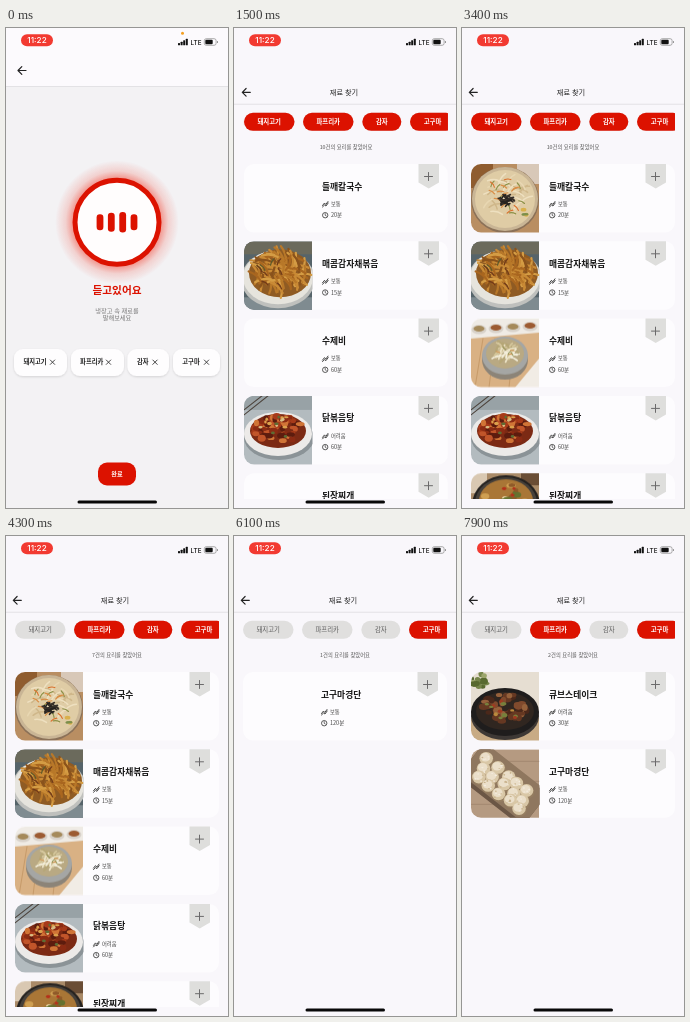
Write an HTML page that moves like this. It is 222 px wide and 480 px high and loops after 8 s.

```html
<!DOCTYPE html>
<html lang="ko">
<head>
<meta charset="utf-8">
<title>재료 찾기</title>
<style>
html, body { margin: 0; width: 100%; height: 100%; overflow: hidden; background: #f9f7fb; }
svg { display: block; width: 222px; height: 480px; }
text { font-family: "Noto Sans CJK KR", "Noto Sans CJK", "Noto Sans KR", sans-serif; }
.latin { font-family: Inter, Roboto, sans-serif; }
.line { fill: none; stroke-linecap: round; stroke-linejoin: round; }
.voice { animation: leave 8s linear infinite; }
.list { animation: enter 8s linear infinite; }
.glow, .bar { transform-box: fill-box; transform-origin: center; }
.glow { animation: glow 1s ease-in-out infinite; }
.bar { animation: bar .8s ease-in-out infinite alternate; }
.bar:nth-of-type(even) { animation-name: bar2; }
@keyframes enter {
  0%, 13.125% { transform: translateX(230px); animation-timing-function: cubic-bezier(.25,.6,.25,1); }
  18.5% { transform: translateX(1px); }
  24%, 100% { transform: none; }
}
@keyframes leave {
  0%, 13.125% { transform: none; animation-timing-function: cubic-bezier(.25,.6,.25,1); }
  18.5%, 100% { transform: translateX(-74px); }
}
@keyframes glow { 50% { transform: scale(1.1); opacity: .75; } }
@keyframes bar { to { transform: scaleY(1.25); } }
@keyframes bar2 { to { transform: scaleY(.75); } }
</style>
</head>
<body>
<svg id="stage" viewBox="0 0 222 480"></svg>
<script>
const LOOP = 8000, RED = '#dc1200';
const rules = [];

// Style that shows an element only from a to b (ms)
function show(a, b) {
  const name = 'show' + rules.length, pc = t => t / LOOP * 100 + '%';
  rules.push(`@keyframes ${name}{0%{opacity:0}${pc(a)}{opacity:1}${pc(b)}{opacity:0}}`);
  return `style="animation:${name} ${LOOP}ms step-end infinite"`;
}

let seed = 7;
const rnd = () => (seed = seed * 16807 % 2147483647) / 2147483647;
const pick = list => list[Math.floor(rnd() * list.length)];

const rect = (x, y, w, h, fill, r = 0, extra = '') =>
  `<rect x="${x}" y="${y}" width="${w}" height="${h}" rx="${r}" fill="${fill}" ${extra}/>`;
const oval = (x, y, rx, ry, fill) => `<ellipse cx="${x}" cy="${y}" rx="${rx}" ry="${ry}" fill="${fill}"/>`;
const shape = (d, fill) => `<path d="${d}" fill="${fill}"/>`;
const line = (d, stroke, width) =>
  `<path class="line" d="${d}" stroke="${stroke}" stroke-width="${width}"/>`;
// y is the optical middle of the line
const text = (x, y, size, label, fill, weight = 400, anchor = 'middle') =>
  `<text x="${x}" y="${y + size * .37}" font-size="${size}" font-weight="${weight}" fill="${fill}" text-anchor="${anchor}">${label}</text>`;
const group = (x, y, body) => `<g transform="translate(${x} ${y})">${body}</g>`;

// Random points inside an ellipse
function scatter(n, cx, cy, rx, ry, draw) {
  let out = '';
  for (let i = 0; i < n; i++) {
    const a = rnd() * Math.PI * 2, r = Math.sqrt(rnd());
    out += draw(cx + Math.cos(a) * r * rx, cy + Math.sin(a) * r * ry);
  }
  return out;
}
const strands = (n, cx, cy, rx, ry, colors, len, width, slope = 0) =>
  scatter(n, cx, cy, rx, ry, (x, y) => {
    const a = slope + (rnd() - .5) * 2.2, dx = Math.cos(a) * len, dy = Math.sin(a) * len;
    return line(`M${x - dx} ${y - dy}Q${x + dy * .4} ${y - dx * .4} ${x + dx} ${y + dy}`, pick(colors), width);
  });
const chunks = (n, cx, cy, rx, ry, colors, size) =>
  scatter(n, cx, cy, rx, ry, (x, y) =>
    oval(x, y, size * (.6 + rnd() * .6), size * (.45 + rnd() * .45), pick(colors)));

// Dish pictures, 68 by 68
const dishes = {
  noodles: () => rect(0, 0, 68, 69, '#b98e62') + rect(0, 0, 22, 24, '#8f5c2f') + rect(46, 0, 22, 20, '#d8c8b8') +
    oval(34, 36, 34, 33, '#8b7158') + oval(34, 35, 33, 32, '#c9b595') + oval(34, 35, 30, 29, '#dfcca5') +
    strands(30, 34, 35, 23, 22, ['#eee0c0', '#cfb78a', '#e8d7b2'], 6, 1.5) +
    strands(20, 34, 33, 20, 18, ['#d9702c', '#d98d45', '#8c9148'], 3.2, 1.2) +
    chunks(4, 50, 50, 6, 5, ['#7c8f4c', '#d9b04c'], 2.5) +
    strands(26, 35, 37, 7, 5, ['#25221f', '#37302a'], 2.6, 1.6),
  potato: () => rect(0, 0, 68, 69, '#56646a') + rect(0, 0, 68, 13, '#6b6a5c') + rect(0, 56, 68, 13, '#7f8b90') +
    oval(34, 38, 37, 29, '#bfc0bd') + oval(34, 36, 35, 27, '#e6e4dd') + oval(36, 32, 31, 24, '#8f5b23') +
    strands(100, 36, 31, 26, 19, ['#c98a35', '#d49c44', '#a9661f', '#b87829', '#8a521b'], 8, 2.2, .8) +
    strands(9, 34, 31, 21, 14, ['#5d5a2a', '#713a18'], 3.5, 1.3),
  soup: () => rect(0, 0, 68, 69, '#d9b184') +
    line('M12 20L4 69M24 20L18 69M40 50L38 69', '#c79b6a', 1) +
    shape('M0 0H68V14L0 20Z', '#efebe5') + shape('M68 40L44 69H68Z', '#f1ece5') +
    [8, 25, 42, 59].map((x, i) => oval(x, 11 - i, 7.5, 4.5, '#d8d2ca') + oval(x, 10 - i, 5.5, 3, i % 2 ? '#9c5b32' : '#a58a5b')).join('') +
    oval(34, 41, 23, 20, '#8c8478') + oval(34, 37, 23, 19, '#a5a6a4') + oval(34, 35, 19, 15, '#b9a983') +
    strands(32, 34, 34, 12, 9, ['#ece3c6', '#d5c79c', '#f3eedb', '#b6a777'], 4.5, 1.7) +
    strands(6, 34, 34, 9, 7, ['#8d9152', '#cf8d49'], 2, 1),
  chicken: () => rect(0, 0, 68, 69, '#b3bbbf') + rect(0, 0, 68, 14, '#98a2a6') +
    line('M0 14L18 0M0 19L24 0', '#4d443d', 1.2) +
    oval(35, 42, 35, 22, '#8b9397') + oval(34, 38, 34, 22, '#eceae8') + oval(34, 35, 28, 17, '#7c2a14') +
    chunks(60, 34, 33, 24, 14, ['#a73a19', '#c1552a', '#8b2b13', '#d07436', '#5d1c0e'], 4) +
    chunks(14, 34, 31, 19, 11, ['#dba04c', '#d8bd84', '#5d6d34'], 2),
  stew: () => rect(0, 0, 68, 69, '#a98a68') + rect(0, 0, 16, 20, '#d9c8b2') + rect(50, 0, 18, 12, '#6a4d35') +
    oval(35, 32, 34, 30, '#24211f') + oval(35, 30, 31, 26, '#46403a') + oval(35, 28, 27, 22, '#a97636') +
    chunks(34, 35, 26, 22, 17, ['#cf9f52', '#eddcab', '#8f5a29', '#e0bd74', '#66722f'], 4) +
    chunks(5, 40, 18, 10, 6, ['#b5301b', '#66722f'], 2),
  balls: () => {
    let out = rect(0, 0, 68, 69, '#b59a81') + line('M0 12H68M0 32H68M0 55H68', '#a38870', 1) +
      '<g transform="rotate(38 34 38)">' + rect(-10, 17, 82, 42, '#6b5645', 5) + rect(-10, 15, 82, 40, '#8f775f', 5) + '</g>';
    for (let i = 0; i < 5; i++) for (let j = 0; j < 3; j++) {
      const x = 15 + i * 10 - j * 4 + rnd() * 3, y = 9 + i * 7.8 + j * 9 + rnd() * 3;
      out += oval(x + .8, y + 1.6, 7, 6.6, '#957d60') + oval(x, y, 6.8, 6.4, '#d9c7a6') +
        oval(x - .8, y - 1.2, 4.8, 4.3, '#ebdfca') + chunks(5, x, y, 5, 5, ['#c9b38d', '#f4ecdf'], 1);
    }
    return out;
  },
  steak: () => rect(0, 0, 68, 69, '#e6ded2') + rect(0, 46, 68, 23, '#c8ab85') +
    chunks(14, 9, 8, 11, 7, ['#76854a', '#9da66c', '#58692f'], 4) +
    oval(34, 44, 34, 24, '#3d3835') + oval(34, 40, 34, 24, '#1f1d1d') + oval(34, 39, 29, 19, '#302620') +
    chunks(44, 34, 36, 23, 14, ['#663822', '#804a2d', '#4b281a', '#96613b'], 4.2) +
    chunks(12, 34, 35, 21, 12, ['#ba8a3d', '#77803c', '#9f3a20'], 2.4)
};

const arrow = (x, y) => line(`M${x + 8} ${y}H${x}M${x + 3.8} ${y - 3.8}L${x} ${y}L${x + 3.8} ${y + 3.8}`, '#222', 1.2);

function card(i, name, level, time, dish, window = '') {
  return group(9, 136 + i * 77.3,
    rect(0, 0, 204, 68.5, '#fdfcfe', 10) +
    `<g clip-path="url(#card)"><g ${window}>${dishes[dish]()}</g></g>` +
    shape('M174.5 0H195V18.5L184.7 24.5L174.5 18.5Z', '#dededc') +
    line('M184.5 8.5V16.5M180.5 12.5H188.5', '#6b6a6b', 1) +
    text(78, 22.3, 8.75, name, '#161616', 700, 'start') +
    line('M78.5 41.5L80.5 39L81.8 40.5L84 37.5M78.5 43L80.5 41L82 42L84.2 39', '#333', .9) +
    text(87, 39.8, 5.3, level, '#444', 500, 'start') +
    '<circle cx="81.2" cy="51.2" r="2.7" fill="none" stroke="#333" stroke-width=".8"/>' +
    line('M81.2 49.6V51.3L82.3 52', '#333', .7) +
    text(87, 51.2, 5.5, time, '#444', 500, 'start'));
}

const pill = (x, w, label, on) =>
  rect(x, 84.8, w, 18, on ? RED : '#e0dfde', 9) +
  text(x + w / 2, 93.4, 6.4, label, on ? '#fff' : '#5c5c5c', on ? 700 : 500);

// windows: spans of time in which the filter is switched on
const filter = (x, w, label, ...windows) => pill(x, w, label, false) +
  windows.map(([a, b]) => `<g ${show(a, b)}>${pill(x, w, label, true)}</g>`).join('');

const count = (n, a, b) => `<g ${show(a, b)}>${text(111, 119.2, 5.3, n + '건의 요리를 찾았어요', '#555', 500)}</g>`;

const tag = (x, w, label, tx, cx) =>
  rect(x, 321, w, 27, '#fefdfe', 9, 'filter="url(#soft)"') +
  text(tx, 334, 6.3, label, '#222', 700) +
  line(`M${cx - 2.2} 332L${cx + 2.2} 336.4M${cx + 2.2} 332L${cx - 2.2} 336.4`, '#333', .9);

const bars = [[94, 16], [105.3, 19], [116.7, 20.5], [128, 16]]
  .map(([x, h]) => rect(x - 3.4, 194.3 - h / 2, 6.8, h, RED, 3.2, 'class="bar"')).join('');

const voice = '<g class="voice">' +
  rect(0, 0, 222, 480, '#f3f2f4') + rect(0, 0, 222, 58, '#fcfafd') + rect(0, 58, 222, .7, '#dddce0') +
  arrow(12, 42.5) +
  '<circle class="glow" cx="111" cy="194.3" r="62" fill="url(#halo)"/>' +
  `<circle cx="111" cy="194.3" r="42" fill="#fffdfd" stroke="${RED}" stroke-width="5"/>` +
  `<g>${bars}</g>` +
  text(111, 261.8, 10.7, '듣고있어요', RED, 700) +
  text(111, 282.4, 6.2, '냉장고 속 재료를', '#777') + text(111, 289.6, 6.2, '말해보세요', '#777') +
  tag(8, 53, '돼지고기', 29, 46.5) + tag(65, 53, '파프리카', 85.7, 102.5) +
  tag(121.5, 41.5, '감자', 136.8, 149) + tag(167, 47, '고구마', 185, 200.5) +
  rect(92, 434.5, 38, 23, RED, 9) + text(111, 446, 6.2, '완료', '#fff', 700) + '</g>';

const swap = 5900, back = 7500;
const list = '<g class="list">' +
  rect(-7, 0, 5, 480, 'url(#edge)') + rect(-2, 0, 224, 480, '#f9f7fb') +
  arrow(7.3, 64.3) + text(109, 64.3, 7.2, '재료 찾기', '#222', 500) + rect(-2, 75.8, 224, .7, '#d9d8dc') +
  '<g clip-path="url(#row)">' +
  filter(9, 50.5, '돼지고기', [0, 3900]) +
  filter(68, 50.5, '파프리카', [0, 4900], [back, LOOP]) +
  filter(127.3, 39, '감자', [0, swap]) +
  filter(175, 45, '고구마', [0, LOOP]) + '</g>' +
  count(10, 0, 3900) + count(7, 3900, 4900) + count(6, 4900, swap) + count(1, swap, back) + count(2, back, LOOP) +
  `<g clip-path="url(#view)"><g ${show(0, swap)}>` +
  card(0, '들깨칼국수', '보통', '20분', 'noodles', show(2000, LOOP)) +
  card(1, '매콤감자채볶음', '보통', '15분', 'potato') +
  card(2, '수제비', '보통', '60분', 'soup', show(2200, LOOP)) +
  card(3, '닭볶음탕', '어려움', '60분', 'chicken') +
  card(4, '된장찌개', '보통', '30분', 'stew', show(2100, LOOP)) + '</g>' +
  `<g ${show(swap, back)}>` + card(0, '고구마경단', '보통', '120분', 'balls', show(6400, LOOP)) + '</g>' +
  `<g ${show(back, LOOP)}>` + card(0, '큐브스테이크', '어려움', '30분', 'steak', show(7700, LOOP)) +
  card(1, '고구마경단', '보통', '120분', 'balls') + '</g></g></g>';

const latin = (x, y, size, label, fill) =>
  `<text class="latin" x="${x}" y="${y}" font-size="${size}" font-weight="500" fill="${fill}" text-anchor="middle">${label}</text>`;

const status = rect(15, 6.2, 32, 12, '#f23a31', 6) + latin(31, 15.2, 8.2, '11:22', '#fff') +
  `<circle cx="176.5" cy="5.3" r="1.5" fill="#f5a021" ${show(0, 1400)}/>` +
  [2.2, 3.5, 4.9, 6.4].map((h, i) => rect(172 + i * 2.6, 17.2 - h, 2, h, '#111', .5)).join('') +
  latin(190, 16.8, 6.3, 'LTE', '#111') +
  rect(198.3, 10.7, 11.8, 6.6, 'none', 2, 'stroke="#888" stroke-width=".7"') +
  rect(199.3, 11.7, 7.4, 4.6, '#111', 1) + rect(211, 12.9, .9, 2.2, '#888', .4) +
  rect(71.5, 472.4, 79.5, 3, '#080808', 1.5);

const defs = `<defs>
  <radialGradient id="halo"><stop offset=".69" stop-color="#ef2a16" stop-opacity=".5"/><stop offset=".83" stop-color="#ef2a16" stop-opacity=".16"/><stop offset="1" stop-color="#ef2a16" stop-opacity="0"/></radialGradient>
  <linearGradient id="edge"><stop stop-color="#000" stop-opacity="0"/><stop offset="1" stop-color="#000" stop-opacity=".05"/></linearGradient>
  <filter id="soft" x="-20%" y="-30%" width="140%" height="170%"><feDropShadow dx="0" dy="1" stdDeviation="1.2" flood-opacity=".13"/></filter>
  <clipPath id="card"><path d="M10 0H68.5V68.5H10A10 10 0 0 1 0 58.5V10A10 10 0 0 1 10 0Z"/></clipPath>
  <clipPath id="row"><rect x="9" y="80" width="204" height="28"/></clipPath>
  <clipPath id="view"><rect y="130" width="222" height="341"/></clipPath>
</defs>`;

const style = document.createElement('style');
style.textContent = rules.join('\n');
document.head.append(style);
document.getElementById('stage').innerHTML = defs + voice + list + status;
</script>
</body>
</html>
```
